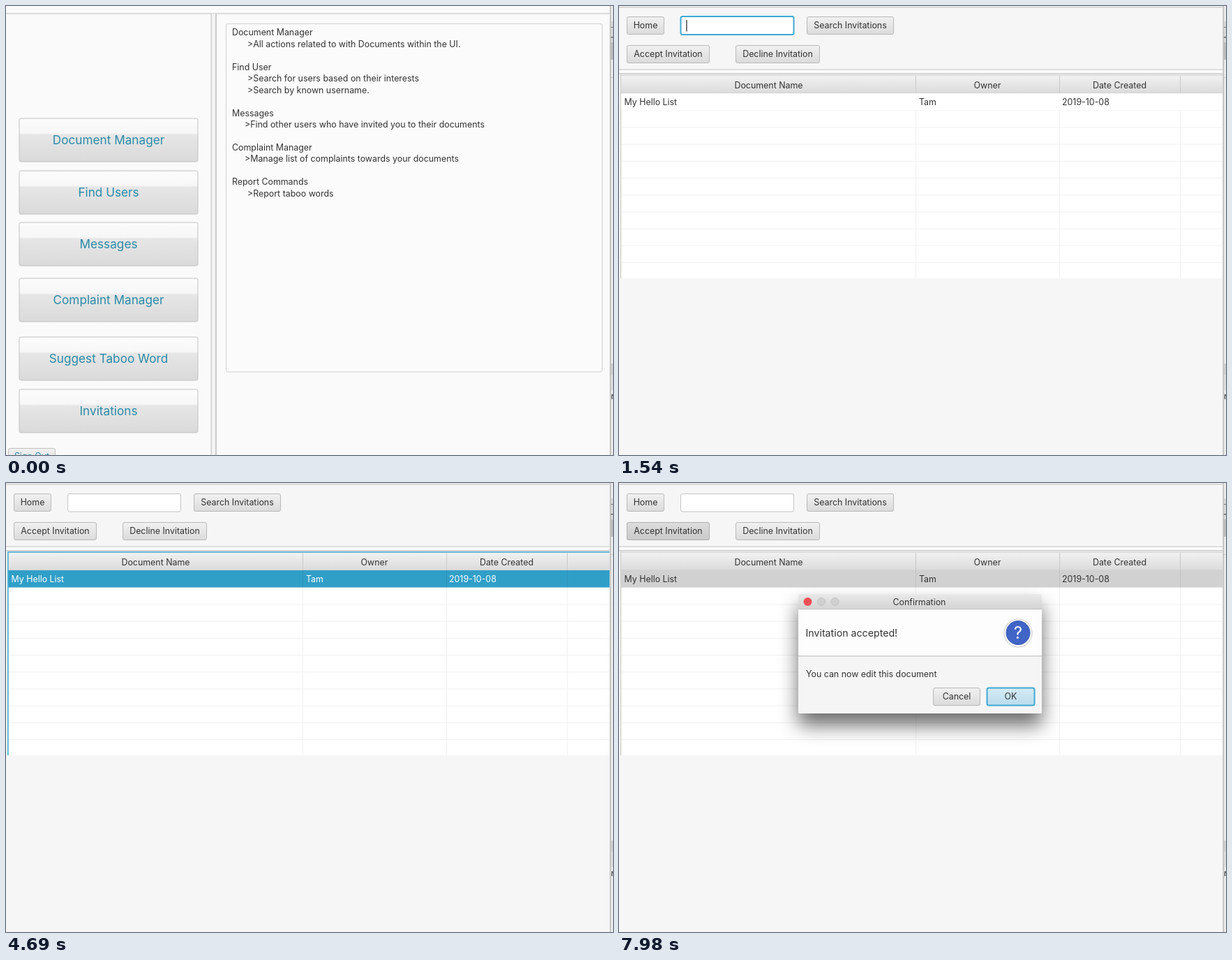
Recreate the animation shown at these times as an HTML page. Size 870 by 643 pixels, loop 8 s.

```html
<!DOCTYPE html>
<html lang="en">
<head>
<meta charset="utf-8">
<title>Invitations</title>
<style>
  html, body { margin: 0; width: 100%; height: 100%; overflow: hidden; background: #f6f6f6; }
  svg { display: block; width: 870px; height: 643px; }
  text { font: 12.4px Inter, "Open Sans", sans-serif; fill: #333; white-space: pre; }
  .mid { text-anchor: middle; }
  .big { font-size: 17.2px; fill: #2a8ba9; }
  .white { fill: #fff; }
</style>
</head>
<body>
<svg id="stage" viewBox="0 0 870 643">
  <defs>
    <linearGradient id="menu" x2="0" y2="1">
      <stop offset="0" stop-color="#fcfcfc"/><stop offset=".34" stop-color="#f7f7f7"/>
      <stop offset=".38" stop-color="#e6e6e6"/><stop offset="1" stop-color="#dadada"/>
    </linearGradient>
    <linearGradient id="btn" x2="0" y2="1">
      <stop stop-color="#f1f1f1"/><stop offset="1" stop-color="#dbdbdb"/>
    </linearGradient>
    <linearGradient id="dark" x2="0" y2="1">
      <stop stop-color="#dedede"/><stop offset="1" stop-color="#c9c9c9"/>
    </linearGradient>
    <linearGradient id="blue" x2="0" y2="1">
      <stop stop-color="#b5dcee"/><stop offset="1" stop-color="#9bcae1"/>
    </linearGradient>
    <linearGradient id="pale" x2="0" y2="1">
      <stop stop-color="#d6ebf5"/><stop offset="1" stop-color="#b9dcec"/>
    </linearGradient>
    <linearGradient id="titlebar" x2="0" y2="1">
      <stop stop-color="#e9e9e9"/><stop offset="1" stop-color="#d3d3d3"/>
    </linearGradient>
    <filter id="blur" x="-20%" y="-40%" width="140%" height="180%">
      <feGaussianBlur stdDeviation="14"/>
    </filter>
  </defs>
</svg>
<script>
const LOOP = 8000;
const OPEN = 1540, SELECT = 3920, PRESS = 5600, DIALOG = 5810, BLUR = 6440, HOVER = 7420;
const BLINK = 490;
const RING = '#3fa9d3';

const stage = document.getElementById('stage');
const parts = [];

function add(parent, tag, attrs, content) {
  const el = document.createElementNS('http://www.w3.org/2000/svg', tag);
  for (const key in attrs) el.setAttribute(key, attrs[key]);
  if (content !== undefined) el.textContent = content;
  return parent.appendChild(el);
}
const rect = (g, x, y, width, height, fill, more) =>
  add(g, 'rect', { x, y, width, height, fill, ...more });
const text = (g, x, y, str, cls = '') => add(g, 'text', { x, y, class: cls }, str);
const dot = (g, cx, cy, r, fill, more) => add(g, 'circle', { cx, cy, r, fill, ...more });

// A group shown from one moment until another, optionally under a further rule.
function layer(parent, from, to, rule) {
  const el = add(parent, 'g', {});
  parts.push({ el, on: t => t >= from && t < to && (!rule || rule(t)) });
  return el;
}

function box(g, x, y, w, h, fill, stroke = '#b9b9b9', line = 1) {
  rect(g, x + .5, y + .5, w, h, fill, { rx: 2.5, stroke, 'stroke-width': line });
}
function button(g, x, y, w, label, fill = 'url(#btn)', stroke, line) {
  box(g, x, y, w, 25, fill, stroke, line);
  text(g, x + w / 2 + .5, y + 17.3, label, 'mid');
}

function drawHome(g) {
  rect(g, 0, 0, 870, 643, '#fafafa');
  rect(g, 0, 10, 866, 1.5, '#d2d2d2');
  rect(g, 293.5, 11, 1.5, 632, '#cfcfcf');
  rect(g, 295, 11, 5, 632, '#f4f4f4');
  rect(g, 300, 11, 2, 632, '#cbcbcb');

  const menu = [
    ['Document Manager', 160], ['Find Users', 235], ['Messages', 309],
    ['Complaint Manager', 389], ['Suggest Taboo Word', 473], ['Invitations', 548]
  ];
  for (const [label, y] of menu) {
    box(g, 18.5, y + .5, 256, 62, 'url(#menu)', '#c1c1c1');
    text(g, 147, y + 38, label, 'mid big');
  }
  box(g, 3, 633, 67, 26, 'url(#btn)', '#c1c1c1');
  text(g, 37, 649, 'Sign Out', 'mid').style.fill = '#2a8ba9';

  box(g, 315, 25, 539, 498.5, '#fbfbfb', '#d0d0d0');
  const help = [
    [0, 324, 'Document Manager'],
    [1, 346, '>All actions related to with Documents within the UI.'],
    [3, 324, 'Find User'],
    [4, 346, '>Search for users based on their interests'],
    [5, 346, '>Search by known username.'],
    [7, 324, 'Messages'],
    [8, 342, '>Find other users who have invited you to their documents'],
    [10, 324, 'Complaint Manager'],
    [11, 342, '>Manage list of complaints towards your documents'],
    [13, 324, 'Report Commands'],
    [14, 346, '>Report taboo words']
  ];
  for (const [row, x, str] of help) text(g, x, 42.3 + row * 16.46, str);
}

function drawRow(g, fill, cls) {
  rect(g, 3, 125, 863, 24.5, fill);
  if (fill !== '#fff') {
    for (const x of [425, 631, 804]) rect(g, x, 125, 1, 24.5, '#000', { opacity: .08 });
  }
  text(g, 7.5, 142, 'My Hello List', cls);
  text(g, 430, 142, 'Tam', cls);
  text(g, 635, 142, '2019-10-08', cls);
}

function drawTable(g) {
  rect(g, 0, 0, 870, 643, '#f6f6f6');
  rect(g, 0, 1, 866, 1.5, '#d0d0d0');
  button(g, 11, 15, 53, 'Home');
  button(g, 269, 15, 124, 'Search Invitations');
  button(g, 11, 56, 118, 'Accept Invitation');
  button(g, 167, 56, 120, 'Decline Invitation');
  box(g, 88, 15, 162, 25.5, '#fff', '#c4c4c4');

  rect(g, 0, 90.5, 866, 1.2, '#cfcfcf');
  rect(g, 0, 92, 866, 4, '#fbfbfb');
  rect(g, 0, 96, 866, 1.5, '#cccccc');
  rect(g, 2, 98, 864, 292, '#fff');
  rect(g, 2, 98.5, 864, 1.2, '#cbcbcb');
  rect(g, 2, 98, 1.2, 292, '#c8c8c8');
  rect(g, 3, 100, 863, 25, 'url(#btn)');
  rect(g, 3, 124.5, 863, 1, '#cdcdcd');
  for (let i = 1; i <= 10; i++) rect(g, 3, 125 + i * 24.2, 863, 1, '#f0f0f0');
  for (const x of [425, 631, 804]) {
    rect(g, x, 100, 1, 25, '#c9c9c9');
    rect(g, x, 126, 1, 264, '#f1f1f1');
  }
  text(g, 214.5, 118, 'Document Name', 'mid');
  text(g, 528, 118, 'Owner', 'mid');
  text(g, 717.5, 118, 'Date Created', 'mid');
}

function drawEdge(g) {
  rect(g, 865, 0, 5, 643, '#ededed');
  rect(g, 865.5, 0, 1.7, 643, '#bdbdbd');
  for (const [y, h, c] of [[22, 55, '#d8d8d8'], [30, 1, '#777'], [44, 1.5, '#666'],
    [52, 25, '#bcbcbc'], [102, 1, '#ccc'], [512, 16, '#cfcfcf'], [528, 22, '#dcdcdc']]) {
    rect(g, 867, y, 3, h, c);
  }
  text(g, 867, 563, 'r');
}

function drawDialog(g) {
  rect(g, 257, 176, 349, 171, '#000', { opacity: .58, filter: 'url(#blur)' });
  rect(g, 257, 159, 349, 171, '#f5f5f5', { rx: 4 });
  rect(g, 257, 175, 349, 155, '#f5f5f5');
  add(g, 'path', { d: 'M257 181v-18q0-4 4-4h341q4 0 4 4v18z', fill: 'url(#titlebar)' });
  rect(g, 257, 180.3, 349, 1, '#bcbcbc');
  rect(g, 257, 181.3, 349, 66, '#fdfdfd');
  rect(g, 257, 247.3, 349, 1.2, '#c3c3c3');
  dot(g, 270.5, 170, 6, '#ee5055');
  for (const x of [290, 309.5]) dot(g, x, 170, 5.5, '#d0d0d0', { stroke: '#c3c3c3' });
  text(g, 430.5, 174.5, 'Confirmation', 'mid');
  text(g, 267.5, 220, 'Invitation accepted!').style.fontSize = '14.2px';
  text(g, 268, 278.3, 'You can now edit this document');
  dot(g, 572, 215, 20, '#fff', { stroke: '#c6c6c6' });
  dot(g, 572, 214.5, 17, '#4165c6', { stroke: '#3556ae' });
  text(g, 572, 223, '?', 'mid white').style.fontSize = '24px';
  button(g, 450, 293, 67, 'Cancel');
}

drawHome(layer(stage, 0, OPEN));

const table = layer(stage, OPEN, LOOP);
drawTable(table);
box(layer(table, OPEN, SELECT), 88, 14.5, 162, 26, '#fff', RING, 2);
rect(layer(table, OPEN, SELECT, t => Math.floor((t - OPEN) / BLINK) % 2 === 0),
  96.3, 20, 1.3, 16.5, '#333');

drawRow(layer(table, OPEN, SELECT), '#fff');
const picked = layer(table, SELECT, PRESS);
drawRow(picked, '#309fc8', 'white');
rect(picked, 2, 98, 864, 1.7, '#55b2d3');
rect(picked, 2, 98, 1.7, 292, '#55b2d3');
drawRow(layer(table, PRESS, LOOP), '#d1d1d1');

button(layer(table, PRESS, BLUR), 11, 56, 118, 'Accept Invitation', 'url(#dark)', RING, 2);
button(layer(table, BLUR, LOOP), 11, 56, 118, 'Accept Invitation', 'url(#dark)', '#b0b0b0');

const dialog = layer(stage, DIALOG, LOOP);
drawDialog(dialog);
button(layer(dialog, DIALOG, HOVER), 527, 293, 68, 'OK', 'url(#blue)', RING, 2);
button(layer(dialog, HOVER, LOOP), 527, 293, 68, 'OK', 'url(#pale)', RING, 2);

drawEdge(add(stage, 'g', {}));

const start = performance.now();
function draw(now) {
  const t = Math.max(0, now - start) % LOOP;
  for (const { el, on } of parts) el.style.display = on(t) ? '' : 'none';
  requestAnimationFrame(draw);
}
draw(start);
</script>
</body>
</html>
```
